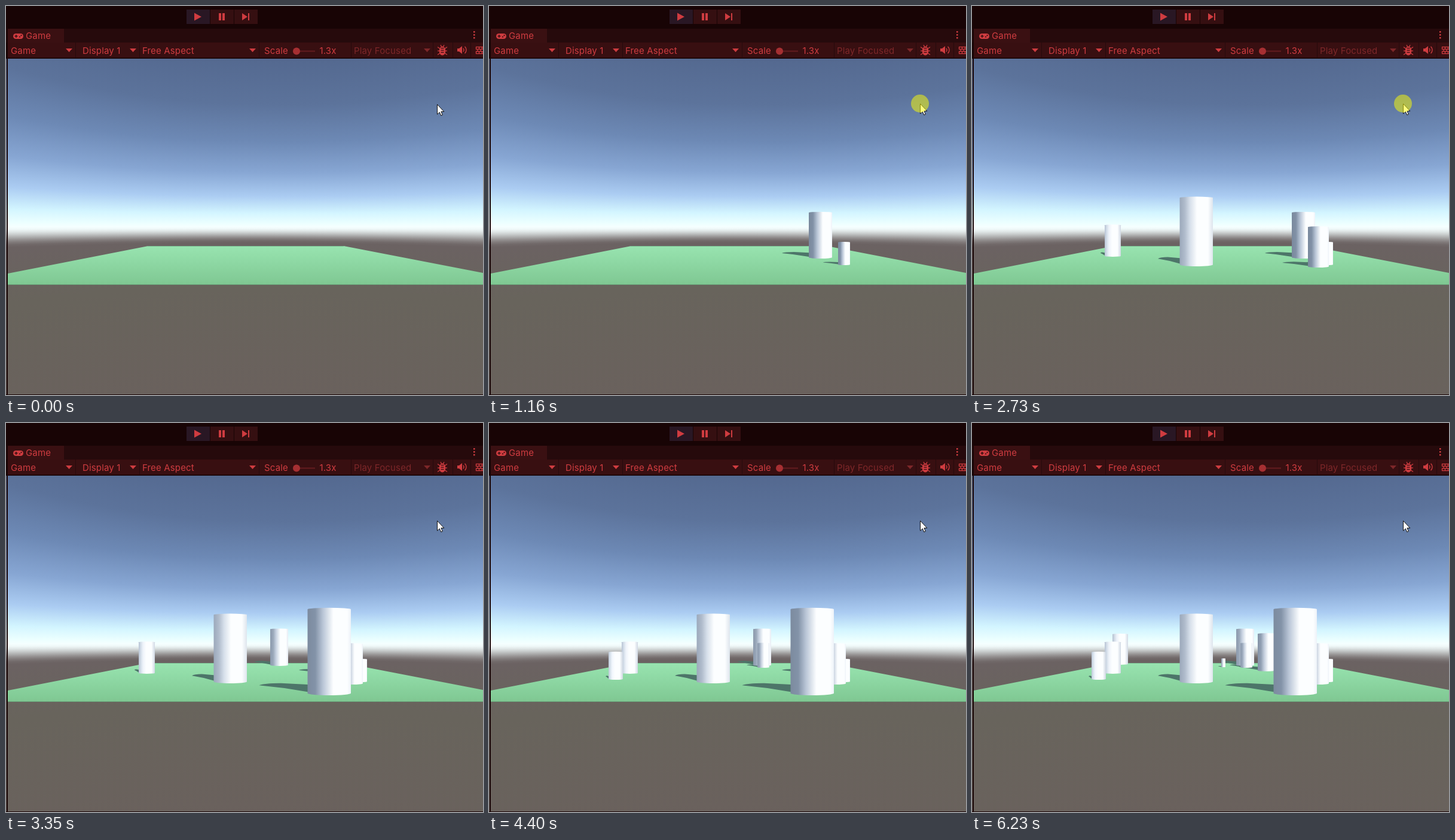
Animation, 798 px wide and 650 px high, one loop 6.37 s. Source, as an HTML page with a canvas:

```html
<!DOCTYPE html>
<html lang="en">
<head>
<meta charset="utf-8">
<title>Spawning cylinders</title>
<style>
html, body { margin: 0; width: 100%; height: 100%; overflow: hidden; background: #180405; }
canvas { display: block; }
</style>
</head>
<body>
<canvas id="stage" width="798" height="650"></canvas>
<script>
const W = 798, H = 650, LOOP = 6370;
const CENTER = 400, HORIZON = 369, FOCAL = 487, VIEW_TOP = 88;
const HOLD = 210, SPAWN_DELAY = 140;
const RED = '#cf3c40', DIM = '#7d2729', BAR = '#380f11', DARK = '#180405';
const ctx = document.getElementById('stage').getContext('2d');

// Each click drops one cylinder: release time, left, width, foot.
const drops = [
  [350, 535, 39, 422],
  [890, 584, 20, 433],
  [1370, 347.5, 55.5, 435],
  [1910, 562, 35, 437],
  [2380, 222, 27, 419],
  [2940, 504.5, 72.5, 455],
  [3350, 442, 30, 406],
  [3980, 449, 20, 409],
  [4400, 200, 24, 429],
  [4930, 515, 20, 409],
  [5270, 478, 31, 415],
  [5880, 417, 7, 408],
  [6230, 235, 26, 404]
].map(([release, x, w, foot]) => {
  const mid = x + w / 2;
  return {
    x, w, foot, mid,
    press: release - HOLD,
    release,
    top: foot - 2.1 * w / stretch(mid),
    reach: w * Math.max(0.1, 0.2 + (mid - 212) * 0.0028)
  };
}).sort((a, b) => a.foot - b.foot);

// Widening of the perspective view away from its middle.
function stretch(x) {
  return Math.hypot(1, (x - CENTER) / FOCAL);
}

function mix(a, b, u) {
  return `rgb(${a.map((v, i) => Math.round(v + (b[i] - v) * u))})`;
}

function rect(c, color, x, y, w, h) {
  c.fillStyle = color;
  c.fillRect(x, y, w, h);
}

function poly(c, color, ...p) {
  c.fillStyle = color;
  c.beginPath();
  for (let i = 0; i < p.length; i += 2) c.lineTo(p[i], p[i + 1]);
  c.closePath();
  c.fill();
}

function dot(c, color, x, y, r) {
  c.fillStyle = color;
  c.beginPath();
  c.arc(x, y, r, 0, 7);
  c.fill();
}

function line(c, color, x1, y1, x2, y2) {
  c.strokeStyle = color;
  c.lineWidth = 1.3;
  c.beginPath();
  c.moveTo(x1, y1);
  c.lineTo(x2, y2);
  c.stroke();
}

function label(c, text, x, y, color = RED) {
  c.font = '15px Inter, sans-serif';
  c.letterSpacing = '0.15px';
  c.fillStyle = color;
  c.fillText(text, x, y);
}

// Sky colours run from the horizon upwards, packed closer near the horizon.
function drawColumn(c, x, w) {
  const sky = ['#f5ffff', '#ecffff', '#d3f5ff', '#abccf2', '#87a6d3', '#6d89b5', '#5c739b', '#546990'];
  const k = stretch(x);
  const height = 281 * k * (1 - 0.12 * Math.max(0, (x - CENTER) / CENTER));
  const up = c.createLinearGradient(0, HORIZON, 0, HORIZON - height);
  sky.forEach((color, i) => up.addColorStop((i / (sky.length - 1)) ** 2, color));
  rect(c, up, x, VIEW_TOP, w, HORIZON - VIEW_TOP);

  const haze = 0.095;
  const down = c.createLinearGradient(0, HORIZON, 0, HORIZON + 281 * k);
  for (let i = 0; i <= 8; i++) {
    const u = i / 8;
    down.addColorStop(u * haze, mix([245, 255, 255], [107, 98, 98], u * u * (3 - 2 * u)));
  }
  down.addColorStop(0.35, '#68645c');
  down.addColorStop(1, '#6a615d');
  rect(c, down, x, HORIZON, w, H - 1 - HORIZON);
}

function drawField(c) {
  const g = c.createLinearGradient(0, 401, 0, 466);
  g.addColorStop(0, '#98e4b0');
  g.addColorStop(1, '#7fc792');
  poly(c, g, 238, 401, 565, 401, 798, 446, 798, 466, 3, 466, 3, 447);
  rect(c, '#7cc094', 237, 401, 328, 1);
  rect(c, '#69a47a', 3, 465, 795, 1);
}

function drawGamepad(c) {
  c.fillStyle = RED;
  c.beginPath();
  c.roundRect(12, 46, 17, 9, 4.5);
  c.fill();
  rect(c, BAR, 14.5, 49.7, 5, 1.5);
  rect(c, BAR, 16.2, 48, 1.5, 5);
  dot(c, BAR, 23, 51.6, 1.1);
  dot(c, BAR, 25.5, 49.2, 1.1);
}

function drawBug(c) {
  for (const side of [-1, 1]) {
    line(c, RED, 730 + side, 69, 730 + side * 3, 65);
    for (const i of [-1, 0, 1]) line(c, RED, 730 + side * 3, 75 + i * 3, 730 + side * 8, 75 + i * 6.5);
  }
  c.fillStyle = RED;
  c.beginPath();
  c.ellipse(730, 75, 5.3, 7.6, 0, 0, 7);
  c.fill();
  for (let i = 0; i < 3; i++) line(c, BAR, 727.5, 70.5 + i * 3.5, 732.5, 70.5 + i * 3.5);
}

function drawSpeaker(c) {
  poly(c, RED, 755, 71, 758, 71, 763, 67, 763, 80, 758, 76, 755, 76);
  c.strokeStyle = RED;
  c.lineWidth = 1.4;
  for (const r of [4, 8]) {
    c.beginPath();
    c.arc(762, 73.5, r, -0.8, 0.8);
    c.stroke();
  }
}

function drawGrid(c) {
  for (let row = 0; row < 4; row++) {
    const y = 68.5 + row * 3.7;
    line(c, RED, 786, y, W, y);
    if (row < 3) for (let x = 786.5 + row % 2 * 2.5; x < W; x += 5) line(c, RED, x, y, x, y + 3.7);
  }
}

function drawChrome(c) {
  rect(c, DARK, 0, 0, W, 38);
  rect(c, '#260a0c', 0, 38, W, 23);
  rect(c, '#3a1012', 3, 38, 94, 23);
  rect(c, BAR, 3, 61, W, 26);
  rect(c, '#160304', 0, 86.5, W, 1.5);
  rect(c, DARK, 1, 38, 2, H - 38);
  rect(c, DARK, 0, H - 1, W, 1);

  for (let i = 0; i < 3; i++) rect(c, i ? '#350f11' : '#291724', 302 + i * 40, 6, 39, 24);
  poly(c, RED, 315, 11.5, 327, 18, 315, 24.5);
  rect(c, RED, 356, 12, 4, 12);
  rect(c, RED, 362, 12, 4, 12);
  poly(c, RED, 395, 12, 404, 18, 395, 24);
  rect(c, RED, 405, 12, 2, 12);

  label(c, 'Game', 33, 55);
  const menu = (text, x, end, color = RED) => {
    label(c, text, x, 80, color);
    poly(c, color, end - 16, 71, end - 5, 71, end - 10.5, 77);
  };
  menu('Game', 8, 116);
  menu('Display 1', 128, 223);
  menu('Free Aspect', 228, 423);
  menu('Play Focused', 582, 715, DIM);
  label(c, 'Scale', 432, 80);
  label(c, '1.3x', 524.5, 80);
  rect(c, '#641d20', 486, 74.5, 31, 2);
  dot(c, '#a62f32', 486, 75.5, 6);

  for (const x of [116, 223, 423, 577, 714, 747, 777]) rect(c, '#260a0c', x, 61, 1, 26);
  for (let i = 0; i < 3; i++) rect(c, RED, 782, 42 + i * 5, 2.5, 2.5);
  drawGamepad(c);
  drawBug(c);
  drawSpeaker(c);
  drawGrid(c);
}

function drawShadow({ x, w, foot, mid, reach }) {
  const tip = x - reach, tipY = foot - w * 0.23, topY = foot - w * 0.28;
  ctx.fillStyle = '#4d7569';
  ctx.beginPath();
  ctx.moveTo(tip, tipY);
  ctx.quadraticCurveTo(tip + reach * 0.1, topY, tip + reach * 0.45, topY);
  ctx.lineTo(x, topY + w * 0.03);
  ctx.lineTo(mid, foot - w * 0.06);
  ctx.lineTo(x, foot - w * 0.08);
  ctx.quadraticCurveTo(x - reach * 0.5, foot - w * 0.18, tip, tipY);
  ctx.fill();
}

// Columns further right show more of their unlit side.
function drawCylinder({ x, w, top, foot, mid }) {
  const u = Math.max(0, Math.min(1, (mid - 210) / 340));
  const g = ctx.createLinearGradient(x, 0, x + w, 0);
  g.addColorStop(0, mix([188, 200, 216], [122, 137, 157], u));
  g.addColorStop(0.13 + 0.05 * u, mix([220, 229, 239], [129, 145, 166], u));
  g.addColorStop(0.26 + 0.1 * u, mix([242, 247, 253], [184, 197, 214], u));
  g.addColorStop(0.45 + 0.15 * u, '#fcfeff');
  g.addColorStop(0.78 + 0.14 * u, '#fcfeff');
  g.addColorStop(1, mix([207, 215, 226], [238, 243, 249], u));

  const up = w * 0.035, down = w * 0.05;
  ctx.fillStyle = g;
  ctx.beginPath();
  ctx.ellipse(mid, top + up, w / 2, up, 0, Math.PI, 2 * Math.PI);
  ctx.ellipse(mid, foot - down, w / 2, down, 0, 0, Math.PI);
  ctx.fill();
}

function drawCursor(x, y) {
  ctx.save();
  ctx.translate(x, y);
  poly(ctx, '#fff', 0, 0, 0, 16.5, 3.8, 13, 6.3, 18.6, 8.8, 17.5, 6.4, 12, 11.3, 12);
  ctx.strokeStyle = '#111';
  ctx.lineWidth = 1;
  ctx.stroke();
  ctx.restore();
}

function paintBackdrop() {
  const canvas = document.createElement('canvas');
  canvas.width = W;
  canvas.height = H;
  const c = canvas.getContext('2d');
  // A sliver of the neighbouring view shows at the far left.
  drawColumn(c, 0, 1);
  for (let x = 3; x < W; x += 2) drawColumn(c, x, 2);
  drawField(c);
  drawChrome(c);
  return canvas;
}

function frame(t) {
  ctx.drawImage(backdrop, 0, 0);
  const shown = drops.filter(d => t >= d.press + SPAWN_DELAY);
  shown.forEach(drawShadow);
  shown.forEach(drawCylinder);
  drawCursor(721.5, t < 70 ? 164.5 : 163.5);
  if (drops.some(d => t >= d.press && t < d.release)) {
    dot(ctx, 'rgba(255, 255, 0, 0.5)', 721, 163, 15);
  }
}

const backdrop = paintBackdrop();
const start = performance.now();
function tick() {
  frame((performance.now() - start) % LOOP);
  requestAnimationFrame(tick);
}
tick();
</script>
</body>
</html>
```
